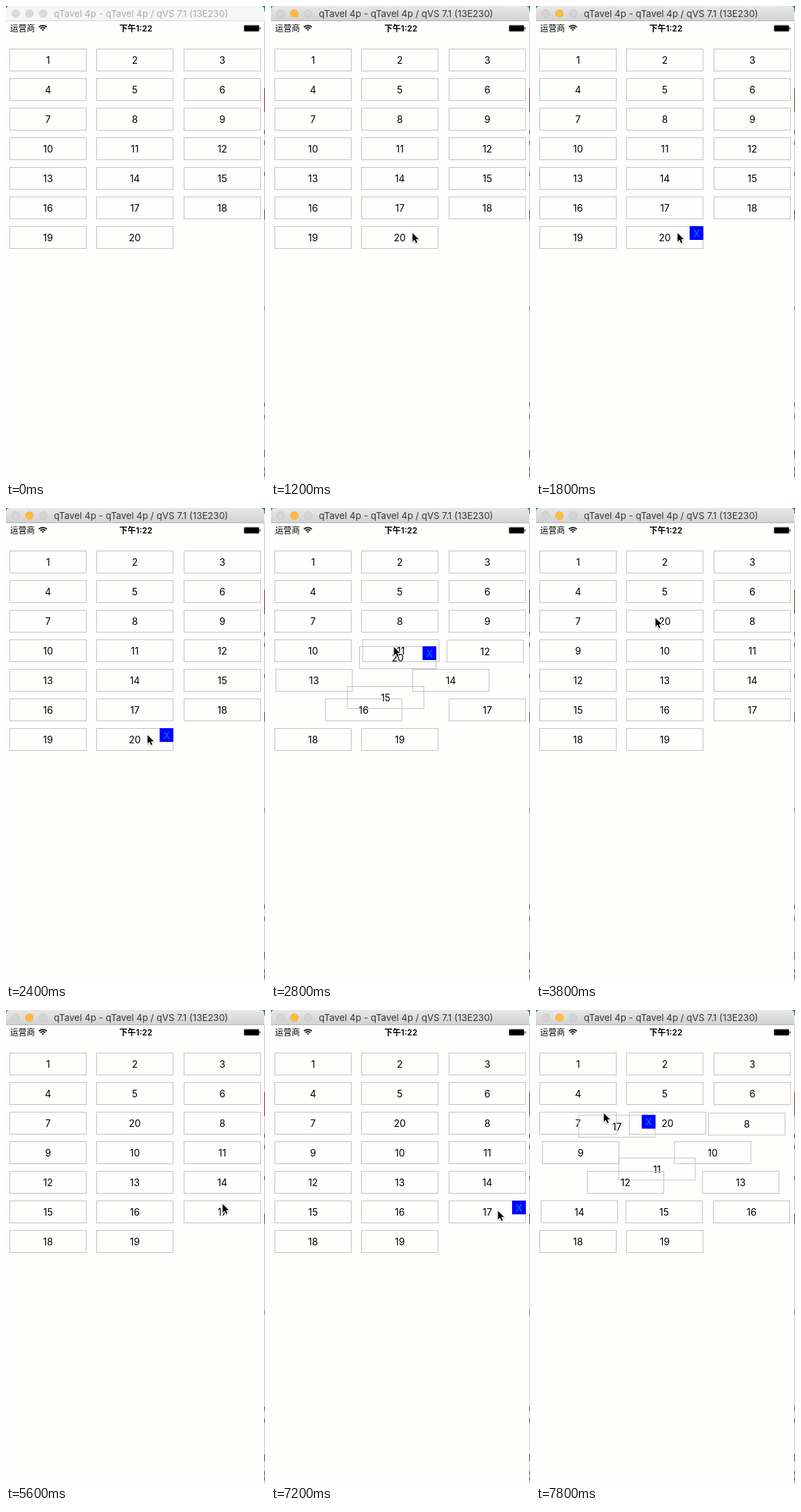
Animation, 376 px wide and 689 px high, one loop 8 s. Source, as an HTML page with a canvas:

```html
<!DOCTYPE html>
<html lang="zh">
<head>
<meta charset="utf-8">
<style>
  html, body { margin: 0; width: 100%; height: 100%; overflow: hidden; background: #fefefd; }
  canvas { display: block; width: 376px; height: 689px; }
</style>
</head>
<body>
<canvas id="stage" width="376" height="689"></canvas>
<script>
const ctx = document.getElementById('stage').getContext('2d');
const LOOP = 8000, STEP = 200, SHIFT_MS = 300;
const COUNT = 20, CELL_W = 112, CELL_H = 33, BADGE = 20;
const UI_FONT = 'Inter, "Noto Sans CJK SC", "Noto Sans CJK", sans-serif';
const TITLE = 'qTavel 4p - qTavel 4p / qVS 7.1 (13E230)';

// Pointer strokes; those with a cell position also carry the held cell there.
const strokes = [
  { begin: 200, end: 1000, cursor: [205, 329] },
  { begin: 2400, end: 2800, cursor: [178, 201], cell: [128, 201] },
  { begin: 2800, end: 3300, cursor: [173, 159], cell: [131, 149] },
  { begin: 5000, end: 5600, cursor: [314, 281] },
  { begin: 5600, end: 6000, cursor: [329, 291] },
  { begin: 7440, end: 7800, cursor: [98, 149], cell: [61.5, 152.5] }
];
const holds = [
  { item: 20, press: 1600, release: 3800 },
  { item: 17, press: 6200, release: LOOP }
];

const clamp = k => Math.min(1, Math.max(0, k));
const ease = k => (1 - Math.cos(Math.PI * clamp(k))) / 2;
const mix = (p, q, k) => p.map((v, i) => v + (q[i] - v) * k);
const slotPos = i => [Math.floor(5 + 126.5 * (i % 3)), 62 + 43 * Math.floor(i / 3)];

const follow = (list, key, from, t) => list.reduce(
  (pos, s) => mix(pos, s[key], clamp((t - s.begin) / (s.end - s.begin))), from);

const heldPos = (hold, t) => follow(
  strokes.filter(s => s.cell && s.begin >= hold.press && s.end <= hold.release),
  'cell', slotPos(hold.slot), t);

function slotUnder([x, y]) {
  const cx = x + CELL_W / 2, cy = y + CELL_H / 2;
  for (let i = 0; i < COUNT; i++) {
    const [sx, sy] = slotPos(i);
    if (cx >= sx && cx < sx + CELL_W && cy >= sy && cy < sy + CELL_H) return i;
  }
  return -1;
}

// Replays the drags: whenever the held cell's centre enters a slot, the others make room.
function planMoves() {
  let order = Array.from({ length: COUNT }, (_, i) => i + 1);
  const moves = Object.fromEntries(order.map((n, i) => [n, [{ time: -SHIFT_MS, slot: i }]]));
  for (const hold of holds) {
    const { item } = hold;
    hold.slot = order.indexOf(item);
    for (let time = hold.press; time < hold.release; time++) {
      const slot = slotUnder(heldPos(hold, time)), before = order;
      if (slot < 0 || before[slot] === item) continue;
      order = before.filter(n => n !== item);
      order.splice(slot, 0, item);
      order.forEach((n, i) => { if (before[i] !== n) moves[n].push({ time, slot: i }); });
    }
  }
  return moves;
}
const moves = planMoves();

const restingPos = (item, t) => moves[item].reduce(
  (pos, { time, slot }) => mix(pos, slotPos(slot), ease((t - time) / SHIFT_MS)),
  slotPos(item - 1));

function rect(color, x, y, w, h) {
  ctx.fillStyle = color;
  ctx.fillRect(x, y, w, h);
}

function roundRect(color, x, y, w, h, radii) {
  ctx.fillStyle = color;
  ctx.beginPath();
  ctx.roundRect(x, y, w, h, radii);
  ctx.fill();
}

function text(str, x, y, size, color = '#000', align = 'center', weight = 400) {
  ctx.font = `${weight} ${size}px ${UI_FONT}`;
  ctx.textAlign = align;
  ctx.fillStyle = color;
  ctx.fillText(str, x, y);
}

function drawTitleBar(active) {
  rect('#2d7b63', 0, 0, 376, 8);
  const shade = ctx.createLinearGradient(0, 0, 0, 22);
  shade.addColorStop(0, active ? '#e9e8e9' : '#f6f6f6');
  shade.addColorStop(1, active ? '#d2d1d2' : '#f6f6f6');
  roundRect(shade, 0, 0, 375, 22, [5, 5, 0, 0]);
  rect(active ? '#b5b4b5' : '#d6d6d6', 0, 21, 375, 1);
  for (let i = 0; i < 3; i++) {
    const lit = active && i === 1;
    ctx.beginPath();
    ctx.arc(14 + 20 * i, 11, 5.7, 0, 7);
    ctx.fillStyle = lit ? '#fdbc40' : active ? '#d5d4d5' : '#dadada';
    ctx.fill();
    ctx.lineWidth = 0.7;
    ctx.strokeStyle = lit ? '#eeb03a' : active ? '#c3c2c3' : '#d0d0d0';
    ctx.stroke();
  }
  text(TITLE, 196, 16, 13.4, active ? '#363636' : '#adadad');
}

function drawStatusBar() {
  text('运营商', 6, 36.5, 12, '#000', 'left');
  text('下午1:22', 188.5, 36.5, 12, '#000', 'center', 600);
  ctx.strokeStyle = '#000';
  ctx.lineWidth = 1.8;
  for (const r of [1.8, 5, 8.2]) {
    ctx.beginPath();
    ctx.arc(53.5, 36.5, r, -Math.PI * 0.75, -Math.PI * 0.25);
    ctx.stroke();
  }
  roundRect('#8a8a8a', 345, 27.5, 23, 10, 2);
  roundRect('#000', 346, 28.5, 21, 8, 1);
  rect('#333', 368.3, 31, 1.2, 3);
}

function drawRightEdge(active) {
  rect('#c9c9c9', 375, 22, 1, 667);
  rect('#6a2c2c', 375, 119, 1, 35);
  for (let i = 0; i < 12; i++) {
    const noise = Math.abs(Math.sin(i * 91.7) * 437.5) % 1;
    rect('#444', 375, i < 6 ? 180 + 150 * noise : 575 + 105 * noise, 1, 6);
  }
  rect(active ? '#777' : '#28a58f', 375, 436, 1, 7);
}

function drawCell(item, [x, y], badge) {
  ctx.strokeStyle = '#c2c2c6';
  ctx.lineWidth = 1;
  ctx.strokeRect(x + 0.5, y + 0.5, CELL_W - 1, CELL_H - 1);
  text(item, x + CELL_W / 2, y + 22, 14);
  if (badge) {
    rect('#00f', x + CELL_W - BADGE, y, BADGE, BADGE);
    text('X', x + CELL_W - BADGE / 2, y + 15.5, 15, '#007aff');
  }
}

const arrow = new Path2D('M0 0V12.5L2.9 9.8 5 14.6 7 13.7 5 9H9Z');

function drawCursor([x, y]) {
  ctx.save();
  ctx.translate(x + 0.5, y + 1);
  ctx.lineJoin = 'round';
  ctx.lineWidth = 1.8;
  ctx.strokeStyle = '#fff';
  ctx.shadowColor = 'rgba(0,0,0,.3)';
  ctx.shadowBlur = 2;
  ctx.shadowOffsetY = 1;
  ctx.stroke(arrow);
  ctx.shadowColor = 'transparent';
  ctx.fillStyle = '#000';
  ctx.fill(arrow);
  ctx.restore();
}

function draw(t) {
  const active = t >= 1000;
  rect('#fefefd', 0, 0, 376, 689);
  drawTitleBar(active);
  drawRightEdge(active);
  drawStatusBar();

  const hold = holds.find(h => t >= h.press && t < h.release);
  for (let item = 1; item <= COUNT; item++) {
    if (item !== hold?.item) drawCell(item, restingPos(item, t));
  }
  if (hold) drawCell(hold.item, heldPos(hold, t), true);
  drawCursor(follow(strokes, 'cursor', [380, 420], t));
}

function tick() {
  const t = performance.now() % LOOP;
  draw(Math.floor(t / STEP) * STEP);
  requestAnimationFrame(tick);
}
tick();
</script>
</body>
</html>
```
